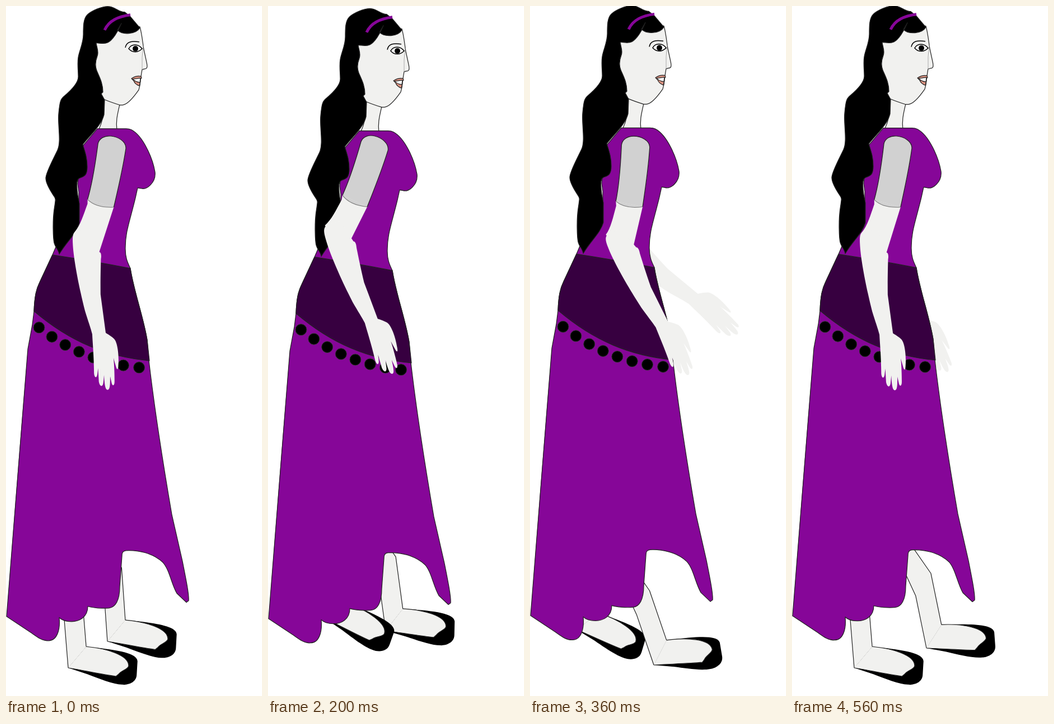
An HTML page that plays this animation: 457 px wide and 1225 px high, repeating every 600 ms.

```html
<!DOCTYPE html>
<html lang="en">
<head>
<meta charset="utf-8">
<title>Walking woman</title>
<style>
  html, body { margin: 0; width: 100%; height: 100%; overflow: hidden; background: #fff; }
  svg { display: block; width: 100%; height: 100%; }
  .skin { fill: #f1f1ef; }
  .line { stroke: #222; stroke-width: 1.2; stroke-linejoin: round; }
  .none { fill: none; }
  .dress { fill: #860698; }
  .sash { fill: #370040; }
</style>
</head>
<body>
<svg viewBox="0 0 457 1225">
  <defs>
    <path id="forearm" class="skin" d="M125 403C119 406 118 412 119 425C121 455 134 510 144 545
      C150 563 155 575 158 586C159 600 162 625 163 655C164 664 168 664 169 657L170 646
      L172 670C174 679 179 680 180 672L181 658C182 670 183 684 188 684S192 672 192 660
      L195 672C197 678 200 676 200 670S199 640 197 627L202 643C204 649 206 648 206 640
      C207 620 203 598 197 593S187 586 182 583L171 515C170 490 170 465 170 452
      C171 446 170 440 167 440L150 400Z"/>
    <g id="foot">
      <path d="M33-37C79-31 124-25 124-9L122 15C121 30 104 33 96 32C79 31 54 20 34 12L0 0Z"/>
      <path class="skin line" d="M33-37C69-33 109-20 108-1C107 5 94 7 90 13L85 17C60 13 22 4 0 0"/>
    </g>
  </defs>

  <use id="farArm" href="#forearm"/>
  <g id="farLeg"><use href="#foot"/><path class="skin line"/></g>
  <g id="nearLeg"><use href="#foot"/><path class="skin line"/></g>

  <g id="body">
    <path class="skin line" d="M172 150L175 166C176 190 172 205 165 220H198C196 205 198 195 203 174Z"/>
    <path class="skin line" d="M239 36C243 50 244 65 246 76L251 99C253 108 252 111 247 111L243 112
      241 124 239 140 237 148C230 158 218 174 208 175L203 175C190 171 182 168 175 165L150 130V50L200 30Z"/>
    <path class="none" stroke="#aaa" d="M245 70Q242 90 243 112"/>
    <path fill="#fff" stroke="#000" stroke-width="1.5" d="M219 75C224 66 236 66 243 75C236 82 226 83 219 75Z"/>
    <circle cx="231" cy="75" r="5"/>
    <path class="none" stroke="#000" stroke-width="1.5" d="M213 73C215 62 225 61 238 63"/>
    <path class="line" fill="#dc9382" d="M224 128C230 124 236 123 241 124L242 127 239 130 240 133 238 141Q230 138 228 132Z"/>
    <path class="line" fill="#fff" d="M226 129L240 127 239 135Q231 134 226 129Z"/>

    <path class="dress line" d="M163 217H214C220 217 222 218 224 219C245 230 262 270 266 294
      C268 312 252 326 241 323L235 322 231 340C220 385 213 400 213 430C213 448 218 456 222 465
      C228 505 245 550 252 592L255 628Q268 740 296 902L315 985C322 1020 327 1045 326 1055L322 1058
      305 1042C295 1025 292 1000 280 987C262 970 235 965 214 966C208 967 207 970 207 976
      L203 1030C203 1055 195 1067 184 1068S155 1068 146 1065C146 1085 130 1092 117 1092
      C107 1092 100 1090 95 1085C97 1105 92 1126 76 1126C65 1127 55 1119 45 1112
      L1 1083Q27 745 39 608L47 565 50 541C51 515 54 502 60 490L83 441 92 420 115 385 130 350V330L128 315 135 250Z"/>
    <path class="sash line" d="M83 441Q155 452 222 465C228 505 245 550 252 592L256 629
      C180 622 115 596 50 541C51 515 54 502 60 490Z"/>
    <g id="beads" stroke="#333"></g>

    <path class="line" d="M182 0C195 0 200 10 212 10L222 18 239 38C232 50 208 51 199 42L206 30
      C200 45 190 60 182 64S165 64 161 65C162 73 166 80 163 88S158 104 162 114 173 135 173 152
      L170 155 176 166 175 192C170 212 150 228 137 245C141 258 145 268 145 285S138 302 131 305 127 325 128 335
      L131 350V385C125 405 110 415 95 440C94 432 88 428 86 420S83 380 86 360 89 342 85 336 71 315 71 305
      85 270 92 255 92 210 94 190 97 165 103 160 129 138 129 125 127 102 129 90 138 65 138 50
      138 22 145 15 170 0 182 0Z"/>
    <path class="none" stroke="#860698" stroke-width="5" d="M176 42C184 25 200 18 222 15"/>
  </g>

  <g id="upperArm">
    <path class="skin" d="M147 344V352C140 372 135 390 125 402L145 430 168 441 194 357 170 340Z"/>
    <path fill="#d1d1d1" class="line" d="M147 344C155 315 160 280 164 245C166 235 176 230 187 231
      C200 232 214 240 214 252C209 290 201 325 194 357"/>
    <path fill="#d1d1d1" stroke="#777" d="M147 344C160 357 180 358 194 357"/>
  </g>
  <use id="nearArm" href="#forearm"/>
</svg>

<script>
const STEP = 40, STEPS = 15;

// Heel paths as a few [step, x, y] points; ankle and knee follow from the heel.
const legs = {
  nearLeg: {
    restX: 100, shinX: 75, floor: 1175,
    heel: [[0, 111, 1175], [2, 79, 1139], [5, 103, 1088], [7, 245, 1127], [9, 221, 1170], [11, 137, 1154], [14, 111, 1175]]
  },
  farLeg: {
    restX: 165, shinX: 150, floor: 1140,
    heel: [[0, 181, 1128], [2, 254, 1117], [5, 210, 1109], [9, 83, 1107], [11, 163, 1132], [14, 240, 1140]]
  }
};

const byId = id => document.getElementById(id);
const setTransform = (element, value) => element.setAttribute('transform', value);
const rad = deg => deg * Math.PI / 180;

byId('beads').innerHTML = Array.from({ length: 8 }, (_, i) =>
  `<circle cx="${59 + 22.5 * i + 0.43 * i * i}" cy="${570 + 17.5 * i - 1.05 * i * i}" r="10"/>`).join('');

// Smooth swell from 0 to 1 and back once per loop; higher power is narrower.
const pulse = (step, peak, power) =>
  (0.5 + 0.5 * Math.cos(2 * Math.PI * (step - peak) / STEPS)) ** power;

// Smooth closed curve through timed points.
function follow(points, step) {
  const n = points.length;
  const at = i => {
    const [time, ...rest] = points[(i + n) % n];
    return [time + STEPS * Math.floor(i / n), ...rest];
  };
  let i = n - 1;
  while (points[i][0] > step) i--;
  const [before, from, to, after] = [i - 1, i, i + 1, i + 2].map(at);
  const span = to[0] - from[0], u = (step - from[0]) / span, v = 1 - u;
  return [1, 2].map(k => {
    const leave = span * (to[k] - before[k]) / (to[0] - before[0]);
    const arrive = span * (after[k] - from[k]) / (after[0] - from[0]);
    return v * v * ((1 + 2 * u) * from[k] + u * leave)
         + u * u * ((3 - 2 * u) * to[k] - v * arrive);
  });
}

// Moves a point upward along a limb that leans left by the given angle.
const climb = ([x, y], length, lean) =>
  [x - length * Math.sin(rad(lean)), y - length * Math.cos(rad(lean))];

function drawLeg(id, { heel, restX, shinX, floor }, step) {
  const [x, y] = follow(heel, step);
  const turn = 0.12 * (restX - x) + (floor - y) ** 2 / 500;
  const shin = 0.13 * (x - shinX);
  const c = Math.cos(rad(turn)), s = Math.sin(rad(turn));
  const ankle = [x + 33 * c + 37 * s, y + 33 * s - 37 * c];
  const back = climb([x, y], 95, shin), knee = climb(ankle, 93, shin);
  const outline = [[x, y], back, climb(back, 80, 25), climb(knee, 60, 35), knee, ankle];
  const [foot, limb] = byId(id).children;
  setTransform(foot, `translate(${x} ${y}) rotate(${turn})`);
  limb.setAttribute('d', 'M' + outline.join('L'));
}

// The forearm bends at the elbow, which hangs from the shoulder.
function drawForearm(id, swing, bend, drop) {
  const c = Math.cos(rad(swing)), s = Math.sin(rad(swing));
  const x = 192 - 57 * c - 149 * s, y = 252 - 57 * s + 149 * c + drop;
  setTransform(byId(id), `translate(${x} ${y}) rotate(${-bend}) translate(-132 -404)`);
}

function draw(ms) {
  const step = Math.floor(ms / STEP) % STEPS;
  setTransform(byId('body'), `translate(0 ${6.5 * pulse(step, 3.7, 2) - 0.9})`);

  const nearSwing = 13 * pulse(step, 3.7, 4) - 4 * pulse(step, 9, 4);
  setTransform(byId('upperArm'), `rotate(${nearSwing} 189 255)`);
  drawForearm('nearArm', nearSwing, 23 * pulse(step, 7.5, 2) - 1.5, 0);

  const reach = pulse(step, 10.1, 1.5);
  drawForearm('farArm', 4 - 8 * reach, 8 + 36 * reach, 5);

  for (const id in legs) drawLeg(id, legs[id], step);
}

const start = performance.now();
function tick() {
  draw(performance.now() - start);
  requestAnimationFrame(tick);
}
tick();
</script>
</body>
</html>
```
